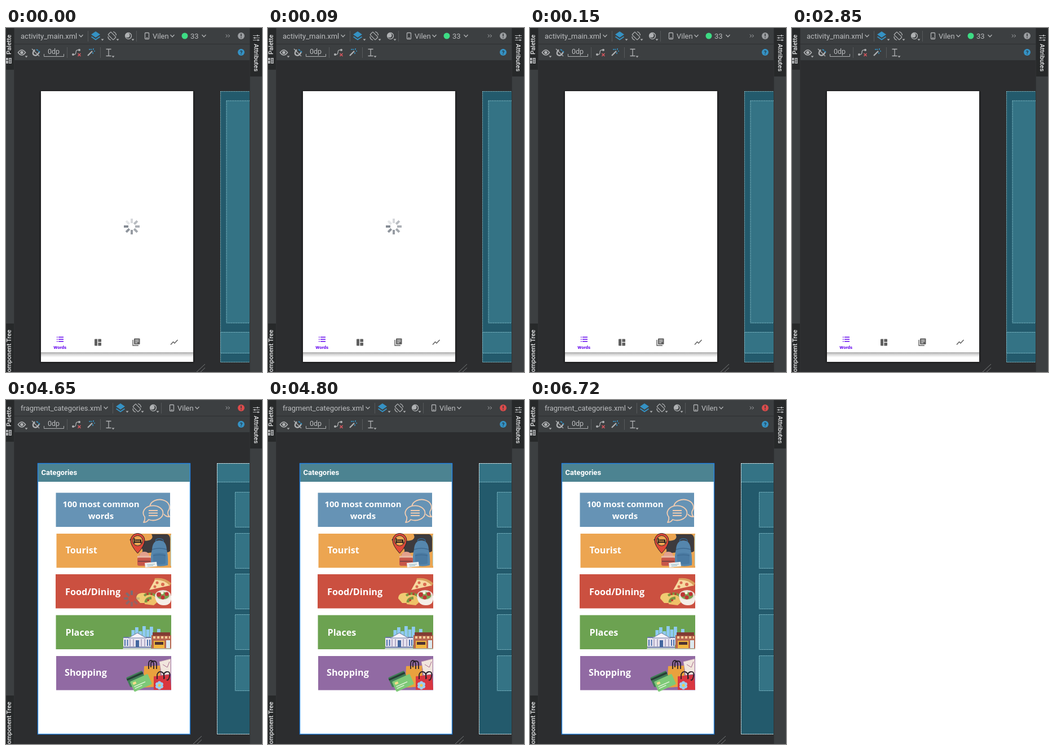
Recreate the animation shown at these times as an HTML page. Size 454 by 610 pixels, loop 8000 ms.

```html
<!DOCTYPE html>
<html lang="en">
<head>
<meta charset="utf-8">
<title>Layout editor</title>
<style>
  html, body { margin: 0; width: 100%; height: 100%; overflow: hidden; background: #2c2d2f; }
  svg { display: block; width: 454px; height: 610px; }
  text { font: 13px Roboto, sans-serif; fill: #bbbdbf; }
  .tab { font-size: 11.1px; font-weight: 500; fill: #e6e7e8; }
  .card { font: 700 16.2px "Open Sans", sans-serif; fill: #fff; }
  .line { fill: none; stroke: #afb1b3; stroke-width: 1.3; }
  .sep { stroke: #56595b; }
  .icon { fill: #afb1b3; }
  .blueprint rect { stroke: #86c3ce; stroke-dasharray: 2 1; }
  .deep { fill: #235a6c; }
  .pane { fill: #347385; }
  .nav { fill: #5f5f5f; }
  .purple { fill: #6200ee; }
  .peach { fill: none; stroke: #f4cdb0; stroke-width: 1.8; stroke-linejoin: round; }
</style>
</head>
<body>
<svg viewBox="0 0 454 610">
  <defs>
    <linearGradient id="shade" x2="0" y2="1">
      <stop stop-color="#aaa"/><stop offset=".45" stop-color="#d9d9d9"/><stop offset="1" stop-color="#fff"/>
    </linearGradient>
    <filter id="glow" x="-5%" y="-5%" width="110%" height="110%"><feGaussianBlur stdDeviation="1.5"/></filter>
    <clipPath id="canvas"><path d="M15 58H432V610H15Z"/></clipPath>
    <path id="chevron" class="line" d="M-3.5-2L0 1.7 3.5-2"/>
    <path id="more" class="icon" d="M-2.5-1.5h5L0 1.5Z"/>

    <g id="deviceTools">
      <use href="#chevron" x="133" y="14"/>
      <path class="sep" d="M145.5 5V24M231.5 5V24"/>
      <path d="M159 6L167 11.5 159 17 151 11.5Z" fill="#3592c4"/>
      <path d="M151.5 15.5L159 20.5 166.500 15.5" fill="none" stroke="#3592c4" stroke-width="2"/>
      <use href="#more" x="171" y="21"/>
      <g class="line">
        <rect x="-3.5" y="-6.5" width="7" height="13" rx="1" transform="translate(188 14) rotate(-45)"/>
        <path d="M190 6.500Q195 8 195.500 13M181 15Q181 20 186 21.500"/>
      </g>
      <use href="#more" x="198" y="21"/>
      <circle class="line" cx="217" cy="14" r="5.5"/>
      <path class="icon" d="M217 8a6 6 0 0 1 0 12 8 8 0 0 0 5-8Z"/>
      <circle class="icon" cx="215.500" cy="13" r="4"/>
      <use href="#more" x="225" y="21"/>
      <rect class="line" x="246.500" y="8.500" width="7" height="11" rx="1"/>
      <path class="line" d="M248.500 17.500h3"/>
      <text x="260" y="19">Vilen</text>
      <use href="#chevron" x="295" y="14"/>
    </g>
  </defs>

  <path d="M0 0H454V610H0Z" fill="#2c2d2f"/>

  <g id="mainScreen" clip-path="url(#canvas)">
    <path d="M61 112H333V593H61Z" fill="#161718" filter="url(#glow)"/>
    <path d="M62 112H332V592H62Z" fill="#fff"/>
    <path d="M62 575H332V584H62Z" fill="url(#shade)"/>
    <path class="purple" d="M90 547.500h1.500v1.500H90zM90 551.200h1.500v1.500H90zM90 555h1.500v1.500H90zM93 547.500h9v1.500h-9zM93 551.200h9v1.500h-9zM93 555h9v1.500h-9z"/>
    <text class="purple" x="95.800" y="569" text-anchor="middle" style="font-size:8px;font-weight:700;fill:#6200ee">Words</text>
    <path class="nav" d="M157 552.500q0-1 1-1h4v12h-4q-1 0-1-1zM163.300 551.500h4.700q1 0 1 1v4.300h-5.700zM163.300 558.100h5.700v4.400q0 1-1 1h-4.700z"/>
    <path fill="none" stroke="#5f5f5f" stroke-width="1.400" d="M225 553V563H235"/>
    <rect class="nav" x="227" y="550.500" width="10.500" height="10.500" rx="1"/>
    <path stroke="#fff" d="M229 553.300h6.500M229 555.800h6.500M229 558.300h4"/>
    <path fill="none" stroke="#5f5f5f" stroke-width="1.500" d="M292 561.500L296.500 556.500 299 559 304.500 553"/>
    <g class="blueprint">
      <rect class="deep" x="380.500" y="112.500" width="70" height="480"/>
      <rect class="pane" x="391" y="129" width="60" height="394"/>
      <rect class="pane" x="380.500" y="539.500" width="70" height="37"/>
    </g>
    <path class="line" style="stroke-width:1;stroke:#77797b" d="M338 610L353 596M345 610L353 602.500"/>
  </g>

  <g id="categoryScreen" clip-path="url(#canvas)">
    <rect x="56.500" y="112.500" width="270" height="480" fill="#fff"/>
    <path d="M57 113H326V145H57Z" fill="#4c8391"/>
    <rect x="56.500" y="112.500" width="270" height="480" fill="none" stroke="#2383e6" stroke-width="1.400"/>
    <text x="62.500" y="133" style="font-weight:700;fill:#fff">Categories</text>
    <g id="cards"></g>

    <!-- Speech bubbles -->
    <g class="peach">
      <path d="M255.200 188A17.500 13.500 0 1 1 287.500 197Q286 203 290 207 283 207 280 202.200"/>
      <path d="M253 212A17.500 13 0 1 0 246 207.200Q247 213 244 217 250 217 253 212Z" fill="#6693b5"/>
      <path d="M253 196h16M253 200.500h16M253 205h16"/>
    </g>

    <!-- Luggage and map pin -->
    <path d="M219 248Q225 242 236 247T256 248Q262 244 258 238H286Q292 240 291 250V268Q286 272 274 270T236 275Q246 268 240 262T219 248Z" fill="#3d3b3e"/>
    <path d="M292.500 239V294" stroke="#a9d6de"/>
    <path d="M233.500 272Q221 258 221 249a12.500 12.500 0 0 1 25 0Q246 258 233.500 272Z" fill="#df4938" stroke="#282326"/>
    <circle cx="233.500" cy="249.500" r="9" fill="#eca551" stroke="#282326"/>
    <path d="M227.500 245V254.500M227.500 252H239.500V254.500M229 248.500H239V251" fill="none" stroke="#201d20" stroke-width="2"/>
    <path d="M266 252Q264 246 272 246T279 252" fill="none" stroke="#345f84" stroke-width="2"/>
    <path d="M257 292Q256 276 259 265 260 249 272 249T285 265Q288 278 287 293Q272 297 257 292Z" fill="#5586ad"/>
    <path d="M261 273Q272 269 283 273V290Q272 293 261 290Z" fill="#4a7aa2"/>
    <path d="M259 265Q272 261 285 265M261 276Q272 273 283 276" fill="none" stroke="#3f6b92" stroke-width="1.500"/>
    <rect x="233" y="279" width="24" height="15" rx="3" fill="#c7574a"/>
    <path d="M237 278Q236 269 245 269T254 278Z" fill="#e3a08c"/>
    <path d="M233 278H257" stroke="#e8b9a4" stroke-width="3"/>
    <path d="M234 286H256" stroke="#804444" stroke-width="2"/>
    <path d="M246 289L267 287 268 295 247 297Z" fill="#eef1ef"/>
    <path d="M250 292L264 291M251 294.500L261 293.500" stroke="#8cb6c5"/>

    <!-- Food -->
    <path d="M264 316Q282 314 293 325L290 330Q280 320 263 320Z" fill="#d9a05c"/>
    <path d="M264 319Q281 318 290 329L254 337Z" fill="#f7d9a0"/>
    <g fill="#d96a50"><circle cx="268" cy="324" r="2.500"/><circle cx="278" cy="327" r="3"/><circle cx="264" cy="331" r="2.500"/></g>
    <path d="M231 352Q231 342 243 342T262 349L257 360H238Z" fill="#f0cb72"/>
    <path d="M246 362Q244 350 256 346 268 345 271 356L262 364Z" fill="#efc168"/>
    <path d="M245 347Q256 339 266 348" fill="none" stroke="#7a9643" stroke-width="4"/>
    <path d="M248 359Q248 352 258 351" fill="none" stroke="#7a9643" stroke-width="5"/>
    <g fill="#b93d30"><circle cx="251" cy="344" r="2"/><circle cx="258" cy="344" r="2"/><circle cx="252" cy="355" r="2"/></g>
    <path d="M264 346Q265 364 280 364T293 347Z" fill="#f5eee7"/>
    <ellipse cx="278.500" cy="346" rx="14" ry="9" fill="#e8e0d6"/>
    <ellipse cx="278.500" cy="347" rx="11" ry="6.500" fill="#79a453"/>
    <g fill="#be3535"><circle cx="271" cy="345" r="4"/><circle cx="278" cy="350" r="3.500"/><circle cx="285" cy="344" r="3.500"/></g>
    <circle cx="277" cy="342" r="2.500" fill="#fff4df"/>

    <!-- Street -->
    <g id="skyline" fill="#8ecbf2"></g>
    <path d="M208 420H257V441H208Z" fill="#e8e4f0"/>
    <path d="M217 422L233 413 249 422Z" fill="#f5f2f8" stroke="#6779a2"/>
    <path d="M208 421H218M248 421H257M208 438.500H257" stroke="#6779a2" stroke-width="2"/>
    <path d="M211 425V436M215.500 425V436M251 425V436M255 425V436" stroke="#4c72ad" stroke-width="2"/>
    <path d="M220 424V437M226 424V437M240 424V437M246 424V437" stroke="#b3abc7" stroke-width="2"/>
    <path d="M230 426h6v12h-6z" fill="#43669f"/>
    <path d="M258 417H293V441H258Z" fill="#b8674f"/>
    <path d="M260 412H291V418H260Z" fill="#823c33"/>
    <path d="M261 421H291" stroke="#f3cd9a" stroke-width="4" stroke-dasharray="4 3"/>
    <path d="M262 427H281V440H262Z" fill="#f0b63f"/>
    <path d="M264 429H279V434H264Z" fill="#4d3333"/>
    <path d="M284 426H291V440H284Z" fill="#dbe9ef"/>
    <path d="M207 441H293" stroke="#d5dbe3"/>

    <!-- Shopping bags -->
    <path d="M272 464L292 459V486L276 488Z" fill="#f1e6dd" stroke="#c59bad" stroke-dasharray="2 1"/>
    <path d="M278 469L286 474 290 464" fill="none" stroke="#a86b8e"/>
    <path d="M245 472L273 471 275 508 243 510Z" fill="#e9a13e"/>
    <path d="M253 477V468Q253 462 257 462T262 468V477M257 474V468Q257 463 262 463T267 468V477" fill="none" stroke="#29212a" stroke-width="1.800"/>
    <path d="M262 490L291 487 293 514H262Z" fill="#d93640"/>
    <path d="M268 495V487Q270 481 275 482T280 489V495M281 494Q278 483 285 482T290 490 285 496" fill="none" stroke="#29212a" stroke-width="1.800"/>
    <g id="flower" fill="#9bcdf0"></g>
    <circle cx="272" cy="506" r="2.500" fill="#f4c64c"/>
    <g transform="translate(236 498) rotate(-24) scale(.86) translate(-236 -496)">
      <rect x="214" y="479" width="36" height="22" rx="2" fill="#427d58"/>
      <path d="M214 484H250" stroke="#263f35" stroke-width="4"/>
      <rect x="218" y="490" width="40" height="23" rx="2" fill="#7ec978"/>
      <rect x="222" y="494" width="7" height="5" fill="#f4dc8b"/>
      <path d="M222 503H247M222 507H238" stroke="#e8f5df" stroke-width="1.500"/>
    </g>

    <g class="blueprint" id="categoryBlueprint">
      <rect class="deep" x="374.500" y="112.500" width="70" height="480"/>
      <rect class="pane" x="374.500" y="112.500" width="70" height="33"/>
      <rect x="374.500" y="112.500" width="70" height="480" fill="none" style="stroke:#e0ecef"/>
    </g>
    <path class="line" style="stroke-width:1;stroke:#77797b" d="M332 610L347 596M339 610L347 602.500"/>
  </g>

  <g id="spinner" fill="#6b727d"></g>

  <!-- Toolbars -->
  <path d="M15 0H432V57H15Z" fill="#3c3f41"/>
  <path d="M15 28.500H432M15 57.500H432" stroke="#2d2f31"/>
  <g id="mainTools">
    <text x="26" y="19">activity_main.xml</text>
    <use href="#deviceTools"/>
    <circle cx="317" cy="14" r="5.500" fill="#3ddc84"/>
    <text x="327" y="19">33</text>
    <use href="#chevron" x="351" y="14"/>
  </g>
  <g id="categoryTools">
    <text x="26" y="19">fragment_categories.xml</text>
    <use href="#deviceTools" x="44"/>
  </g>
  <path class="line" style="stroke-width:1" d="M390 11.500L392.500 14 390 16.500M394 11.500L396.500 14 394 16.500"/>
  <circle id="alert" cx="417" cy="14" r="6"/>
  <path d="M417 10V15M417 16.500V18" stroke="#3c3f41" stroke-width="1.700"/>

  <path class="line" d="M21.500 43.500Q28 34.500 34.500 43.500 28 52.500 21.500 43.500Z" style="stroke-width:1.700"/>
  <circle class="icon" cx="28" cy="43.500" r="2.700"/>
  <use href="#more" x="36" y="51"/>
  <path class="line" d="M48 40V44.500Q49 49 53 48.500T57 43V39" transform="rotate(35 52 44)" style="stroke-width:2.400"/>
  <path d="M54 38L57 40M58 41L60 43" stroke="#3592c4" stroke-width="2"/>
  <path class="line" d="M46 37L59 50"/>
  <text x="74" y="46" style="font-size:12.500px">0dp</text>
  <path class="line" style="stroke-width:1" d="M67.500 46V50.500H102.500V46"/>
  <path class="sep" d="M108.500 34V53M167.500 34V53"/>
  <path class="line" d="M119 47Q124 48 124 43T130 39"/>
  <circle class="icon" cx="119" cy="47" r="2"/><circle class="icon" cx="130" cy="39" r="2"/>
  <path d="M127.500 45L132.500 50M132.500 45L127.500 50" stroke="#db5860" stroke-width="1.500"/>
  <path class="line" d="M145 49L153 41" style="stroke-width:2.300"/>
  <path d="M155 36V39M154 43V46M147 38H150M156 41H158M151 37L152 39" stroke="#3592c4" stroke-width="1.500"/>
  <path class="line" d="M177.500 37.500H186.500M182 38V49M177.500 49.500H186.500"/>
  <use href="#more" x="190" y="51"/>
  <circle cx="417" cy="43" r="6" fill="#3592c4"/>
  <text x="417" y="46.500" text-anchor="middle" style="font-size:9.500px;font-weight:700;fill:#273a46">?</text>

  <!-- Side tabs -->
  <path d="M0 0H14V610H0ZM433 0H454V610H433Z" fill="#3c3f41"/>
  <path d="M0 0H14V74H0ZM0 524H14V610H0ZM433 0H454V86H433Z" fill="#27292a"/>
  <path d="M14.500 0V610M432.500 0V610" stroke="#303234"/>
  <text class="tab" transform="translate(8.500 47) rotate(-90)">Palette</text>
  <text class="tab" transform="translate(8.500 535) rotate(-90)" text-anchor="end">Component Tree</text>
  <text class="tab" transform="translate(440 28) rotate(90)">Attributes</text>
  <path class="icon" d="M0 53H4V57H0zM5 53H10V63H5zM0 58H4V63H0z"/>
  <path d="M6 55.500H9M6 58H9M6 60.500H9" stroke="#27292a"/>
  <path class="line" d="M438 13.500H450M438 17.500H450M438 21.500H450" style="stroke-width:1"/>
  <path class="icon" d="M445 12h2v3h-2zM440 16h2v3h-2zM446 20h2v3h-2z"/>
</svg>

<script>
const byId = id => document.getElementById(id);

function add(parent, tag, attributes, text = "") {
  const node = document.createElementNS("http://www.w3.org/2000/svg", tag);
  for (const name in attributes) node.setAttribute(name, attributes[name]);
  node.textContent = text;
  return parent.appendChild(node);
}

const cards = [
  { x: 88.5, y: 164.5, width: 202.5, fill: "#6693b5" },
  { x: 89.5, y: 237, width: 203.5, fill: "#eca551", label: "Tourist", left: 105.5, base: 272 },
  { x: 88, y: 309, width: 205, fill: "#cb5040", label: "Food/Dining", left: 105, base: 346 },
  { x: 88.5, y: 381.5, width: 204.5, fill: "#6ca251", label: "Places", left: 105.5, base: 418 },
  { x: 89, y: 454, width: 204, fill: "#916aa3", label: "Shopping", left: 104, base: 489 }
];
for (const { x, y, width, fill, label, left, base } of cards) {
  add(byId("cards"), "rect", { x, y, width, height: 60.5, fill });
  if (label) add(byId("cards"), "text", { x: left, y: base, class: "card" }, label);
  add(byId("categoryBlueprint"), "rect", {
    class: "pane", x: 406.5, y: Math.floor(y) - 0.5, width: 40, height: 62
  });
}
[["100 most common", 190], ["words", 211]].forEach(([text, y]) =>
  add(byId("cards"), "text", {
    x: 168.5, y, class: "card", "text-anchor": "middle", style: "font-size:14.900px"
  }, text));

[14, 26, 31, 24, 33, 27, 32, 22, 28, 18].forEach((height, i) =>
  add(byId("skyline"), "rect", { x: 216 + i * 6.5, y: 434 - height, width: 5.8, height }));

for (let i = 0; i < 6; i++) {
  add(byId("flower"), "circle", { cx: 272, cy: 501.5, r: 3, transform: `rotate(${i * 60} 272 506)` });
}

// Blades run clockwise from the top.
const bladeOpacity = [0.28, 0.48, 0.56, 0.62, 0.7, 0.76, 0.82, 0.18];
bladeOpacity.forEach((opacity, i) =>
  add(byId("spinner"), "rect", {
    x: 221, y: 338, width: 4, height: 8, opacity, transform: `rotate(${i * 45} 223 352)`
  }));

const LOOP = 8000, SWITCH = 4650, SPIN = 150;
const show = (id, visible) => byId(id).style.display = visible ? "" : "none";

function draw(now) {
  const time = now % LOOP;
  const categories = time >= SWITCH;
  show("mainScreen", !categories);
  show("mainTools", !categories);
  show("categoryScreen", categories);
  show("categoryTools", categories);
  show("spinner", time < SPIN || categories && time < SWITCH + SPIN);
  byId("spinner").setAttribute("transform", `rotate(${categories ? 90 : 0} 223 352)`);
  byId("alert").setAttribute("fill", categories ? "#db4b4b" : "#9a9da0");
}

const start = performance.now();
function tick() {
  draw(performance.now() - start);
  requestAnimationFrame(tick);
}
tick();
</script>
</body>
</html>
```
